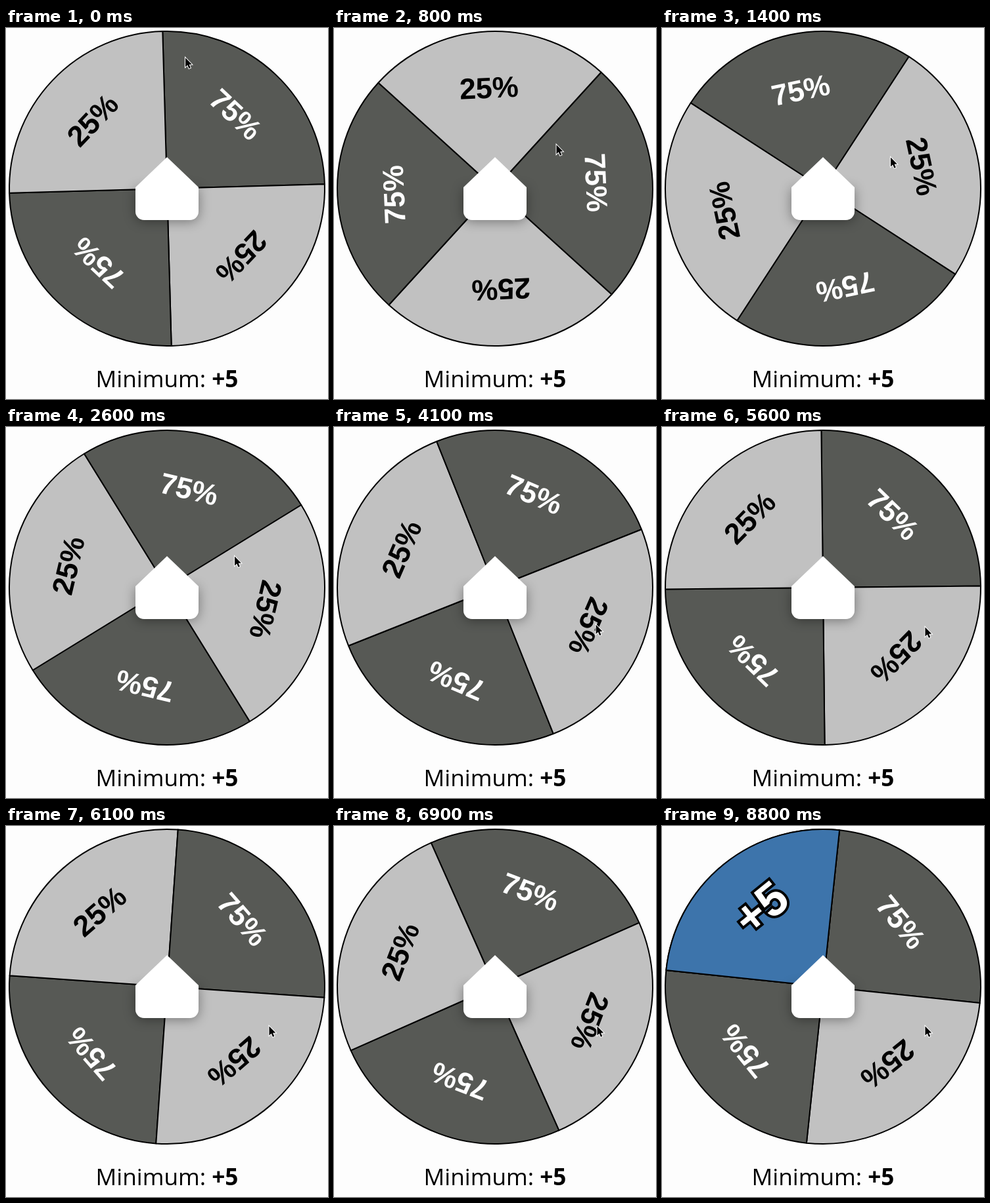
Write an HTML page with a canvas that moves like this. It is 490x566 px and loops after 8900 ms.

```html
<!DOCTYPE html>
<html lang="en">
<head>
<meta charset="utf-8">
<title>Chance wheel</title>
<style>
  html, body { margin: 0; width: 100%; height: 100%; overflow: hidden; background: #fdfdfd; }
  canvas { position: absolute; left: 0; top: 0; }
  p {
    position: absolute; left: 0; top: 510px; width: 490px; margin: 0;
    font: 35.2px/48px "Open Sans", "Noto Sans", sans-serif;
    text-align: center; white-space: nowrap; color: #000;
  }
</style>
</head>
<body>
<canvas id="stage" width="490" height="566"></canvas>
<p>Minimum: <b>+5</b></p>
<script>
const ctx = document.getElementById('stage').getContext('2d');
const LOOP = 8900, STEP = 100;
const CX = 245, CY = 245, R = 240;
const DARK = '#575955', LIGHT = '#c1c1c1', BLUE = '#3d74ab';
const START = -1.6; // resting angle in degrees
const rad = deg => deg * Math.PI / 180;
const clamp = x => Math.max(0, Math.min(1, x));
const smooth = x => { x = clamp(x); return x * x * (3 - 2 * x); };

// Each spin brakes towards `end` (seconds): left to go = s² (a + b s)
const spins = [
  { end: 3.05, total: 879.9, a: 38, b: 24.9 },
  { end: 7.55, total: 1287.7, a: 58, b: 19.7 }
];

function turned({ end, total, a, b }, t) {
  const s = Math.max(0, end - t / 1000);
  const d = total - s * s * (a + b * s);
  const soft = 80; // short run-up
  if (d < -soft) return 0;
  return d < soft ? (d + soft) ** 2 / (4 * soft) : d;
}

function label(text, size, x, y, color, outline) {
  ctx.font = `bold ${size}px "Liberation Sans", Arial, sans-serif`;
  ctx.textAlign = 'center';
  if (outline) {
    ctx.lineWidth = outline;
    ctx.lineJoin = 'miter';
    ctx.miterLimit = 3;
    ctx.strokeStyle = '#000';
    ctx.strokeText(text, x, y);
  }
  ctx.fillStyle = color;
  ctx.fillText(text, x, y);
}

// A quarter of the wheel, centred on straight up
function quarter(fill) {
  ctx.beginPath();
  ctx.moveTo(0, 0);
  ctx.arc(0, 0, R, rad(-135), rad(-45));
  ctx.closePath();
  ctx.fillStyle = fill;
  ctx.fill();
  ctx.lineWidth = 2;
  ctx.lineJoin = 'round';
  ctx.strokeStyle = '#000';
  ctx.stroke();
}

function wheel(angle, win) {
  for (let i = 0; i < 4; i++) {
    const dark = i % 2 === 0;
    ctx.save();
    ctx.translate(CX, CY);
    ctx.rotate(rad(angle + 45 + 90 * i));
    quarter(dark ? DARK : LIGHT);
    label(dark ? '75%' : '25%', 44.8, -2, -138.5, dark ? '#fff' : '#000');
    if (i === 3 && win > 0) {
      ctx.globalAlpha = win;
      quarter(BLUE);
      label('+5', 72, 2, -128, '#fff', 8);
    }
    ctx.restore();
  }
}

function pointer() {
  ctx.save();
  ctx.fillStyle = '#fff';
  ctx.shadowColor = 'rgba(0,0,0,.4)';
  ctx.shadowBlur = 18;
  ctx.shadowOffsetY = 2;
  ctx.beginPath();
  ctx.roundRect(197, 243, 96, 50, [0, 0, 13, 13]);
  ctx.fill();
  ctx.shadowColor = 'transparent';
  ctx.beginPath();
  ctx.moveTo(245, 197);
  ctx.lineTo(293, 243);
  ctx.lineTo(293, 250);
  ctx.lineTo(197, 250);
  ctx.lineTo(197, 243);
  ctx.fill();
  ctx.restore();
}

function cursor(t) {
  const p = smooth((t - 100) / 900), q = smooth((t - 3300) / 900);
  ctx.save();
  ctx.translate(273 + 75 * p + 52.5 * q, 45.5 + 152 * p + 108 * q);
  ctx.beginPath();
  [[0, 0], [0, 14], [3.2, 11], [5.5, 16.2], [7.8, 15.2], [5.6, 10.2], [9.8, 10]]
    .forEach(([x, y]) => ctx.lineTo(x, y));
  ctx.closePath();
  ctx.lineWidth = 2;
  ctx.strokeStyle = '#fff';
  ctx.stroke();
  ctx.fillStyle = '#000';
  ctx.fill();
  ctx.restore();
}

function draw(now) {
  const t = Math.floor(now % LOOP / STEP) * STEP;
  const angle = spins.reduce((sum, spin) => sum + turned(spin, t), START);
  ctx.clearRect(0, 0, 490, 566);
  wheel(angle, clamp((t - 7900) / 500));
  pointer();
  cursor(t);
}

const begun = performance.now();
function tick() {
  draw(performance.now() - begun);
  requestAnimationFrame(tick);
}
tick();
</script>
</body>
</html>
```
